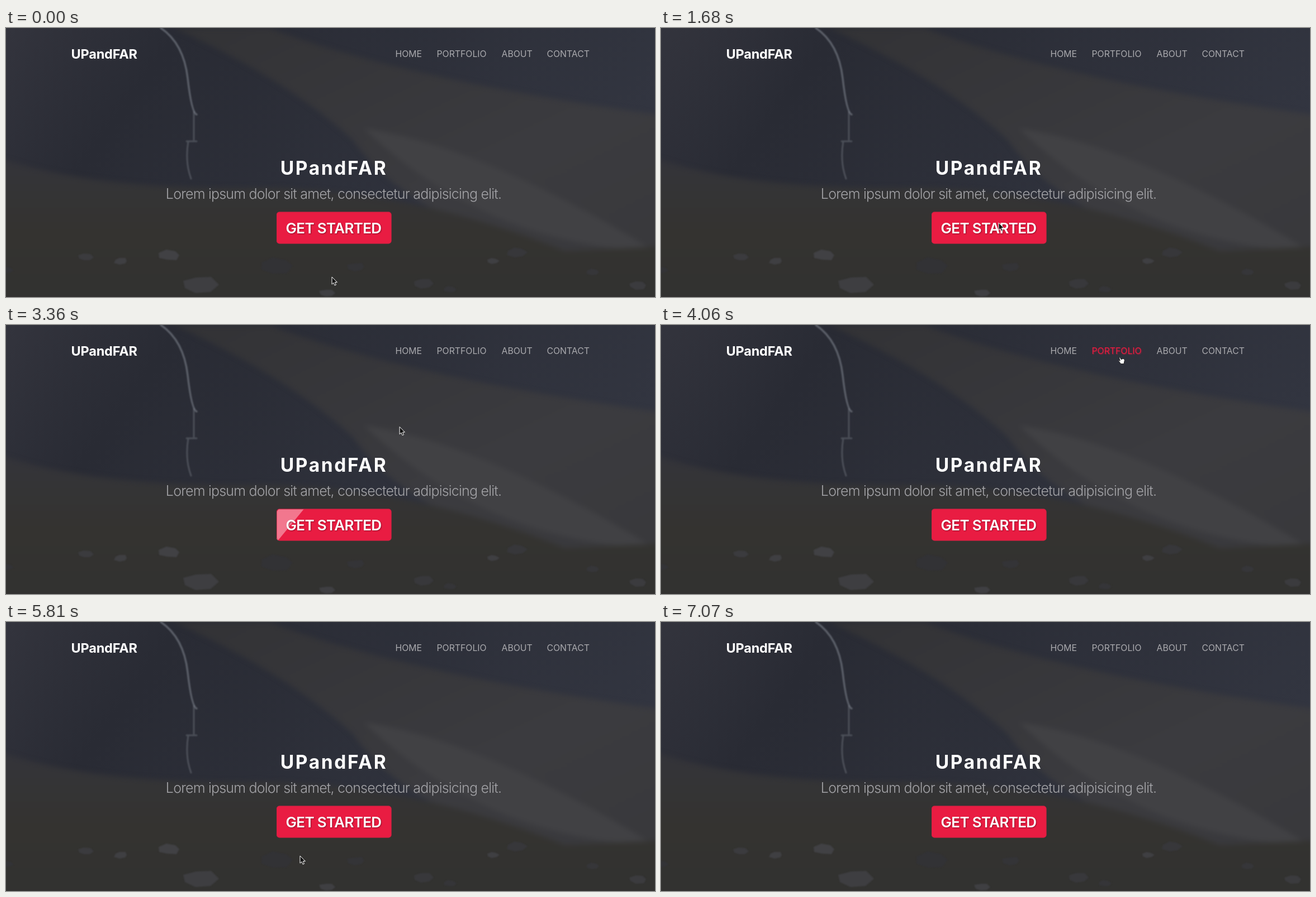
An HTML page that plays this animation: 1161 by 482 pixels, repeating every 7630 ms.

```html
<!DOCTYPE html>
<html lang="en">
<head>
<meta charset="utf-8">
<title>Landing page</title>
<style>
  html, body { margin: 0; width: 100%; height: 100%; overflow: hidden; background: #2d2e37; }
  svg { position: absolute; inset: 0; width: 100%; height: 100%; display: block; }
  #photo { will-change: transform; }
  text { font-family: Inter, Roboto, "Liberation Sans", sans-serif; fill: #fff; }
  .logo { font-size: 23.5px; font-weight: 700; letter-spacing: -.2px; }
  .title { font-size: 33.5px; font-weight: 700; letter-spacing: 2.6px; text-anchor: middle; }
  .lead { font-size: 25px; font-weight: 300; letter-spacing: -.8px; text-anchor: middle; fill: #a3a3a7; }
  .nav text { font-size: 15.8px; fill: #aaaaae; }
  .cta { font-size: 26px; font-weight: 600; letter-spacing: -.65px; text-anchor: middle;
         text-shadow: 1px 1px 2px rgba(60, 0, 15, .5); }
</style>
</head>
<body>
<svg id="photo" viewBox="0 0 1161 482" preserveAspectRatio="none">
  <defs>
    <linearGradient id="cliff" x2="1" y2=".3">
      <stop offset="0" stop-color="#33343d"/>
      <stop offset=".25" stop-color="#292b34"/>
      <stop offset="1" stop-color="#323540"/>
    </linearGradient>
    <linearGradient id="slope" x2="1" y2="1">
      <stop offset="0" stop-color="#323235"/>
      <stop offset=".6" stop-color="#3b3b3f"/>
      <stop offset="1" stop-color="#38383b"/>
    </linearGradient>
    <linearGradient id="ground" x2="0" y2="1">
      <stop offset="0" stop-color="#34343a"/>
      <stop offset=".5" stop-color="#343330"/>
      <stop offset="1" stop-color="#313130"/>
    </linearGradient>
    <filter id="soft" color-interpolation-filters="sRGB"><feGaussianBlur stdDeviation="5"/></filter>
    <filter id="edge" color-interpolation-filters="sRGB"><feGaussianBlur stdDeviation="1.2"/></filter>
  </defs>
  <rect width="1161" height="482" fill="url(#cliff)"/>
  <g filter="url(#soft)">
    <path d="M300 0H470Q720 95 1200 160V430Q760 400 620 200 500 90 300 0Z" fill="url(#slope)"/>
    <path d="M640 180Q850 210 1161 400 860 390 640 180Z" fill="#414144"/>
    <path d="M-20 230Q150 290 430 286T1000 400L1200 390V500H-20Z" fill="url(#ground)"/>
  </g>
  <g id="rocks" filter="url(#edge)"/>
  <g fill="none" stroke="#8c929b" stroke-linecap="round" filter="url(#edge)">
    <path d="M277 0Q318 28 325 90T341 155" stroke-width="3.5" opacity=".5"/>
    <path d="M336 150V200M323 203H341M326 203Q320 240 331 270" stroke-width="3" opacity=".35"/>
  </g>
</svg>
<svg viewBox="0 0 1161 482" preserveAspectRatio="none">
  <defs>
    <clipPath id="face"><rect x="484" y="329.5" width="205.5" height="57" rx="5"/></clipPath>
  </defs>
  <text class="logo" x="116.5" y="54.5">UPandFAR</text>
  <g class="nav">
    <text x="696.5" y="52">HOME</text>
    <text x="770.5" y="52">PORTFOLIO</text>
    <text x="886.5" y="52">ABOUT</text>
    <text x="967.5" y="52">CONTACT</text>
  </g>
  <text class="title" x="586.5" y="263">UPandFAR</text>
  <text class="lead" x="586" y="306">Lorem ipsum dolor sit amet, consectetur adipisicing elit.</text>
  <g clip-path="url(#face)">
    <rect x="484" y="329" width="206" height="58" fill="#e91c42"/>
    <path id="shine" d="M0 330H45L-2 387H-47Z" fill="#fff" opacity=".4"/>
  </g>
  <rect x="484.5" y="330" width="204.5" height="56" rx="5" fill="none" stroke="#c92343" stroke-opacity=".7"/>
  <text class="cta" x="586" y="367.5">GET STARTED</text>
  <g id="cursor" stroke-linejoin="round">
    <path id="arrow" d="M0 0V13.2L3 10.5 5 15.2 7.4 14.2 5.4 9.6H9.4Z" fill="#111" stroke="#fff"/>
    <path id="hand" d="M1 1Q3 0 4.8 5Q11 2 11 7L9.6 13H4.6L.4 8Q.5 6 3 7.7Z" fill="#fff" stroke="#111" stroke-width=".9"/>
  </g>
</svg>
<script>
const LOOP = 7630, TICK = 70;
const $ = id => document.getElementById(id);
const clamp = v => Math.min(1, Math.max(0, v));
const mix = (a, b, k) => a + (b - a) * k;

// pointer moves: start, end, x, y; it rests in between
const HOME = [583, 446];
const moves = [
  [0, 280, 606, 362], [980, 1120, 600, 320], [1610, 1680, 604, 349],
  [2170, 2310, 610, 350], [3010, 3620, 774, 58], [3850, 4940, 1004, 51],
  [5250, 5810, 526, 419], [5950, 6160, 604, 360], [6580, 7070, 640, 490]
];

// the button is hovered from, until
const visits = [[560, 1050], [2450, 3080], [6090, 6580]];
const SWEEP_IN = 490, SWEEP_OUT = 350, LEFT = 439, RIGHT = 737;

const GREY = [170, 170, 174], RED = [232, 28, 64];
const links = [...document.querySelectorAll(".nav text")].map(node => {
  const box = node.getBBox();
  return { node, middle: box.x + box.width / 2 };
});

function pointerAt(t) {
  return moves.reduce(([x, y], [a, b, toX, toY]) => {
    const k = clamp((t - a) / (b - a));
    return [mix(x, toX, k), mix(y, toY, k)];
  }, HOME);
}

function shineAt(t) {
  const [a, b] = visits.findLast(v => t >= v[0]) || [LOOP, LOOP];
  return t < b
    ? mix(LEFT, RIGHT, clamp((t - a) / SWEEP_IN) ** 1.2)
    : mix(RIGHT, LEFT, clamp((t - b) / SWEEP_OUT) ** .8);
}

function draw(t) {
  const [x, y] = pointerAt(t);
  const onNav = y < 70;
  const pointing = onNav || visits.some(([a, b]) => t >= a && t < b);
  $("cursor").setAttribute("transform", `translate(${x} ${y})`);
  $("arrow").style.display = pointing ? "none" : "";
  $("hand").style.display = pointing ? "" : "none";
  $("shine").setAttribute("transform", `translate(${shineAt(t)} 0)`);
  for (const { node, middle } of links) {
    const k = onNav ? clamp((52 - Math.abs(x - middle)) / 10) : 0;
    node.style.fill = `rgb(${GREY.map((g, c) => Math.round(mix(g, RED[c], k)))})`;
    node.style.textShadow = k ? `1px 1px 2px rgba(232,28,64,${.5 * k})` : "none";
  }
}

function scatterRocks(count) {
  let seed = 11;
  const random = () => (seed = seed * 16807 % 2147483647) / 2147483647;
  for (let i = 0; i < count; i++) {
    const x = 1161 * (i + random()) / count, y = 400 + 75 * random();
    const size = mix(12, 38, random() ** 2), tone = mix(50, 66, random());
    const points = Array.from({ length: 7 }, (_, n) => {
      const angle = n / 7 * 2 * Math.PI, r = size * mix(.75, 1, random());
      return [x + r * Math.cos(angle), y + r * .5 * Math.sin(angle)].map(Math.round);
    });
    const rock = document.createElementNS("http://www.w3.org/2000/svg", "polygon");
    rock.setAttribute("points", points.join(" "));
    rock.setAttribute("fill", `rgb(${tone},${tone},${tone + 3})`);
    $("rocks").append(rock);
  }
}

scatterRocks(14);
const start = performance.now();
function frame() {
  const t = (performance.now() - start) % LOOP;
  draw(Math.floor(t / TICK) * TICK);
  requestAnimationFrame(frame);
}
frame();
</script>
</body>
</html>
```
